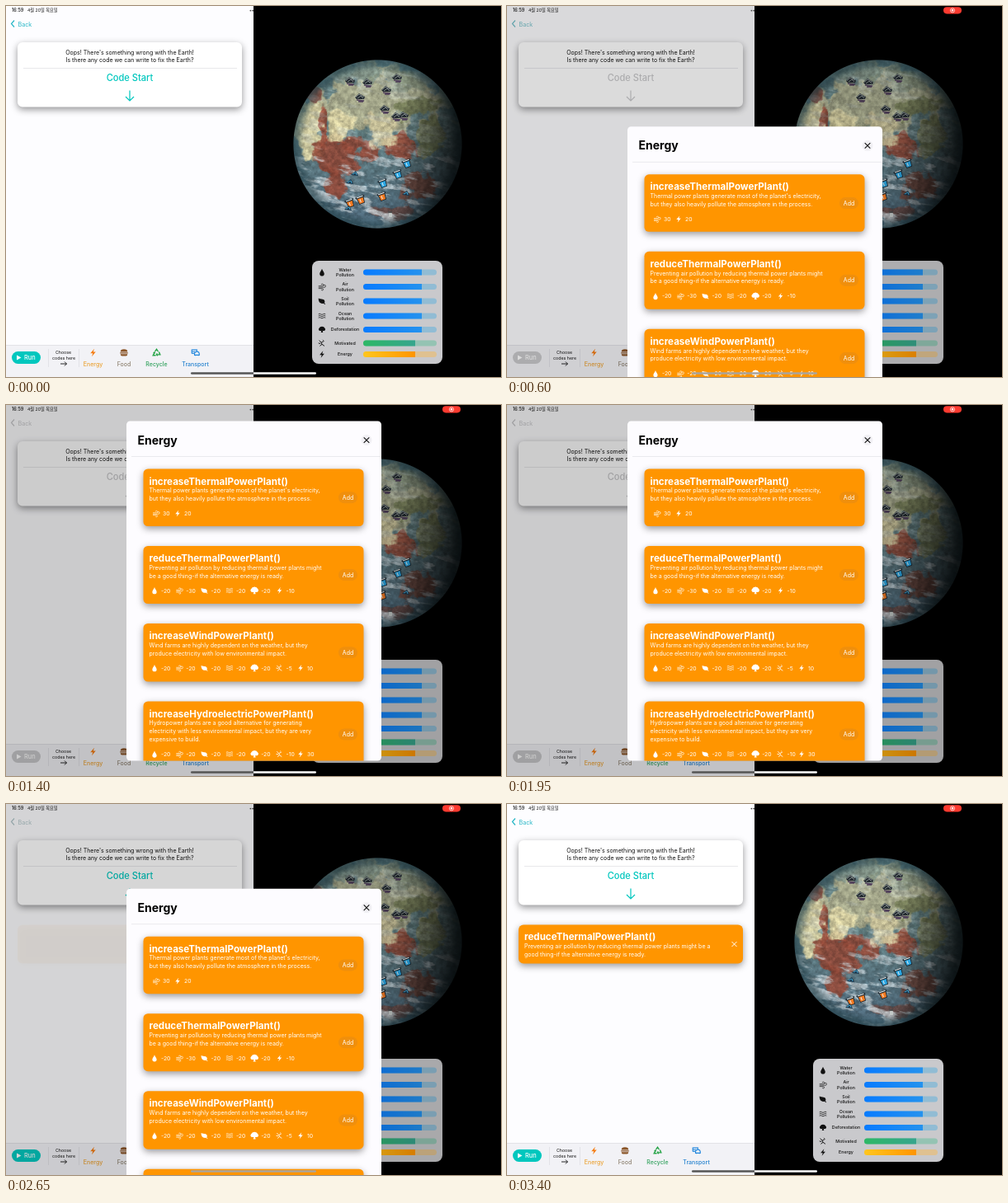
Animation, 600 px wide and 450 px high, one loop 3450 ms. Source, as an HTML page with a canvas:

```html
<!DOCTYPE html>
<html lang="en">
<head>
<meta charset="utf-8">
<title>Fix the Earth</title>
<style>
  html, body { margin: 0; width: 100%; height: 100%; overflow: hidden; background: #000; }
  canvas { display: block; width: 600px; height: 450px; }
</style>
</head>
<body>
<canvas id="stage" width="600" height="450"></canvas>
<script>
const LOOP = 3450, STEP = 50;
const SHEET = { x: 146, top: 19.5, w: 309, h: 412, openAt: 455, closeAt: 2605.5 };
const ORANGE = '#ff9500', MINT = [0, 199, 190], TEAL = [38, 182, 198], GRAY = [200, 200, 202];
const stageCtx = document.getElementById('stage').getContext('2d');
let ctx = stageCtx;

// Glyphs live in a 10-unit box around the origin.
const ICONS = {
  drop: { d: 'M0-5C1-2 3.3 0 3.3 2A3.3 3.3 0 0 1-3.3 2C-3.3 0-1-2 0-5Z' },
  wind: { d: 'M-5-1H.5A1.5 1.5 0 1 0-1-2.6M-5 .8H3.4A1.7 1.7 0 1 0 1.8-1.2M-5 2.5H.5A1.3 1.3 0 1 1-.8 4', line: .8 },
  leaf: { d: 'M-5-4C-1-2 4-4 4 1C4 4-2 4.5-4 1C-5-1-5-3-5-4ZM2 1.5L5 4L4.3 4.6L1 2.5Z' },
  waves: { d: 'M-5-2.6Q-3.3-4-1.7-2.6T1.7-2.6T5-2.6M-5 0Q-3.3-1.4-1.7 0T1.7 0T5 0M-5 2.6Q-3.3 1.2-1.7 2.6T1.7 2.6T5 2.6', line: .9 },
  tree: { d: 'M-.8 1.8H-3.2A2.2 2.2 0 0 1-4-2A4.2 3.6 0 0 1 4-2A2.2 2.2 0 0 1 3.2 1.8H.8L1.5 4.2H-1.5Z' },
  person: { d: 'M-4-4L-1-1L3-3M-1-1L0 1.5L3.5 4M0 1.5L-3 4M1-4.5L2-4M-5 0L-2 .5', line: 1.1 },
  bolt: { d: 'M1.6-5L-3.4 .8H-.3L-1.6 5L3.4-1H.3Z' },
  recycle: { d: 'M-2-1.5L0-4.5L2-1.5M3-1L4.5 2.5H1.2M-1 3.5H-4.5L-2.8 0M.8 1L0 2.5L1.4 4M-4 .5L-2.8-.5L-1.8 1', line: 1.5 },
  burger: { d: 'M-4.5-1A4.5 3.4 0 0 1 4.5-1ZM-5-.3H5V1H-5ZM-4.5 1.8H4.5Q4.5 4.3 2.5 4.3H-2.5Q-4.5 4.3-4.5 1.8Z' },
  car: { d: 'M-4.5 1V-3.5H2V-1M-4.5-1H0M-1 3V1L0-1H4L5 1V3ZM-4.5 1H-1M0 3V4M4 3V4', line: 1.2 }
};
for (const icon of Object.values(ICONS)) icon.path = new Path2D(icon.d);

const CARDS = [
  { y: 58, h: 69.5, title: 'increaseThermalPowerPlant()',
    lines: ["Thermal power plants generate most of the planet's electricity,", 'but they also heavily pollute the atmosphere in the process.'],
    stats: [['wind', '30'], ['bolt', '20']] },
  { y: 151.5, h: 70, title: 'reduceThermalPowerPlant()',
    lines: ['Preventing air pollution by reducing thermal power plants might', 'be a good thing-if the alternative energy is ready.'],
    stats: [['drop', '-20'], ['wind', '-30'], ['leaf', '-20'], ['waves', '-20'], ['tree', '-20'], ['bolt', '-10']] },
  { y: 245.5, h: 70.5, title: 'increaseWindPowerPlant()',
    lines: ['Wind farms are highly dependent on the weather, but they', 'produce electricity with low environmental impact.'],
    stats: [['drop', '-20'], ['wind', '-20'], ['leaf', '-20'], ['waves', '-20'], ['tree', '-20'], ['person', '-5'], ['bolt', '10']] },
  { y: 340, h: 80, title: 'increaseHydroelectricPowerPlant()',
    lines: ['Hydropower plants are a good alternative for generating', 'electricity with less environmental impact, but they are very', 'expensive to build.'],
    stats: [['drop', '-20'], ['wind', '-20'], ['leaf', '-20'], ['waves', '-20'], ['tree', '-20'], ['person', '-10'], ['bolt', '30']] }
];

const clamp = v => Math.max(0, Math.min(1, v));
const smooth = v => { v = clamp(v); return v * v * (3 - 2 * v); };
const lerp = (a, b, k) => a + (b - a) * k;
const blend = (a, b, k) => a.map((v, i) => lerp(v, b[i], k));
const mix = (a, b, k) => `rgb(${blend(a, b, k).map(Math.round).join()})`;
const spring = (t, w) => t <= 0 ? 0 : 1 - (1 + w * t / 1000) * Math.exp(-w * t / 1000);

function text(str, x, y, size, color, weight = 400, align = 'left') {
  ctx.font = `${weight} ${size}px Inter, "Noto Sans CJK KR", "Noto Sans CJK", sans-serif`;
  ctx.textAlign = align;
  ctx.fillStyle = color;
  ctx.fillText(str, x, y + size * .36);
}

function box(x, y, w, h, r, fill, shadow) {
  ctx.save();
  if (shadow) {
    ctx.shadowColor = `rgba(0,0,0,${shadow})`;
    ctx.shadowBlur = 9;
    ctx.shadowOffsetY = 3;
  }
  ctx.beginPath();
  ctx.roundRect(x, y, w, h, r);
  ctx.fillStyle = fill;
  ctx.fill();
  ctx.restore();
}

function path(d, color, width) {
  const p = new Path2D(d);
  if (width) {
    ctx.strokeStyle = color;
    ctx.lineWidth = width;
    ctx.stroke(p);
  } else {
    ctx.fillStyle = color;
    ctx.fill(p);
  }
}

function icon(name, x, y, size, color) {
  const { path, line } = ICONS[name];
  ctx.save();
  ctx.translate(x, y);
  ctx.scale(size / 10, size / 10);
  ctx.fillStyle = ctx.strokeStyle = color;
  ctx.lineWidth = line || 1;
  line ? ctx.stroke(path) : ctx.fill(path);
  ctx.restore();
}

function gradient(x0, x1, ...colors) {
  const g = ctx.createLinearGradient(x0, 0, x1, 0);
  colors.forEach((c, i) => g.addColorStop(i / (colors.length - 1), c));
  return g;
}

function hash(x, y) {
  const s = Math.sin(x * 127.1 + y * 311.7) * 43758.5453;
  return s - Math.floor(s);
}

function noise(x, y) {
  const ix = Math.floor(x), iy = Math.floor(y), u = smooth(x - ix), v = smooth(y - iy);
  return lerp(lerp(hash(ix, iy), hash(ix + 1, iy), u), lerp(hash(ix, iy + 1), hash(ix + 1, iy + 1), u), v);
}

function fractal(x, y) {
  let sum = 0;
  for (let i = 0, amp = .5; i < 4; i++, amp /= 2, x *= 2.03, y *= 2.03) sum += amp * noise(x, y);
  return sum / .9375;
}

// Regions of the globe: centre, radii and colour; noise frays their edges.
const LAND = [172, 172, 140], PALE = [214, 206, 160], RUST = [142, 72, 56], GREEN = [118, 126, 88];
const REGIONS = [
  [450, 112, 92, 46, LAND], [420, 82, 42, 12, [125, 144, 134]], [485, 88, 35, 15, [128, 140, 120]],
  [368, 148, 19, 34, PALE], [372, 106, 12, 9, RUST], [385, 145, 5, 22, RUST],
  [401, 186, 24, 26, RUST], [424, 166, 18, 12, RUST], [478, 170, 22, 15, RUST], [438, 178, 15, 12, RUST],
  [404, 146, 17, 18, PALE], [454, 150, 17, 22, [200, 192, 152]], [512, 157, 18, 22, GREEN],
  [492, 125, 30, 14, GREEN], [398, 214, 18, 16, RUST], [500, 218, 24, 20, [112, 72, 62]], [470, 252, 25, 9, [105, 76, 72]]
];

function globeColor(x, y) {
  const n = fractal(x / 13, y / 13), detail = fractal(x / 4 + 30, y / 4);
  let color = blend([96, 124, 126], [78, 104, 120], clamp((y - 150) / 100));
  for (const [cx, cy, rx, ry, tone] of REGIONS) {
    const d = Math.hypot((x - cx) / rx, (y - cy) / ry);
    color = blend(color, tone, smooth((1.05 - d + (n - .5) * 1.7) * 3.5) * .9);
  }
  const streak = fractal((x + y * .45) / 20, (y - x * .25) / 6 + 60);
  const southern = clamp((y - 172) / 22);
  color = blend(color, [200, 211, 216], smooth((streak - .48) * 5) * lerp(.25, .72, southern));
  color = color.map(c => c * lerp(.72, 1.28, detail));
  const edge = Math.hypot(x - 450.5, y - 167.5) / 102;
  const light = (1 - .78 * smooth((x + (y - 167) * .12 - 462) / 95)) * (1 - .3 * smooth((edge - .84) / .16));
  return blend(color, [62, 115, 132], .55 * smooth((edge - .86) / .14)).map(c => c * light);
}

function plant(x, y) {
  ctx.save();
  ctx.translate(x, y);
  path('M-6 0L-1-5L6-1L5 2L-4 2Z', '#232a30');
  path('M-5-.5L-1-4L5-1M-3 1L1-2L4 1', '#9ca5a2', .8);
  path('M-4 3L5 4M-2 5H4', '#50405a', 1.3);
  ctx.restore();
}

function can(x, y, color) {
  ctx.save();
  ctx.translate(x, y);
  ctx.rotate(-.35);
  path('M-5.5-4.5H5.5V-2.5H4.5L3.5 5H-3.5L-4.5-2.5H-5.5Z', '#17232c');
  path('M-3.6-2H3.6L2.8 4.2H-2.8Z', color);
  path('M-4-3.5H4M-.7-1V3', '#e8eeee', 1);
  ctx.restore();
}

function drawEarth() {
  const left = 347, top = 64, size = 207, pixels = ctx.createImageData(size, size);
  for (let i = 0; i < size * size; i++) {
    const x = left + i % size + .5, y = top + Math.floor(i / size) + .5;
    const cover = clamp(102.6 - Math.hypot(x - 450.5, y - 167.5));
    if (cover) pixels.data.set([...globeColor(x, y), cover * 255], i * 4);
  }
  ctx.putImageData(pixels, left, top);

  [[417, 91], [438, 93], [474, 87], [461, 102], [429, 111], [459, 125], [473, 134], [482, 133]].forEach(p => plant(...p));
  [[417, 239], [430, 235], [456, 231]].forEach(p => can(...p, '#f47b22'));
  [[486, 191], [475, 204], [457, 215]].forEach(p => can(...p, '#2ba6e2'));
  for (const [x, y] of [[423, 203], [417, 213], [485, 227], [415, 245]]) {
    path(`M${x - 5} ${y + 2}L${x + 1} ${y - 3}L${x + 4} ${y + 3}Z`, '#17344b');
    path(`M${x - 3} ${y + 1}L${x + 1} ${y - 1}L${x + 2} ${y + 2}`, '#45a4cd', 1);
  }
  box(464, 251, 4, 5, 1, '#c3c9c7');
  path('M463 250H468', '#3d4a4d', 1);
}

function drawPanel() {
  box(371, 309, 158, 125, 8, '#c9c9cc');
  const blue = ['#087bff', '#2492ee', '#91bcd4'], rows = [
    ['drop', 323, ['Water', 'Pollution'], 504, blue],
    ['wind', 340.5, ['Air', 'Pollution'], 504, blue],
    ['leaf', 358, ['Soil', 'Pollution'], 504, blue],
    ['waves', 376, ['Ocean', 'Pollution'], 504, blue],
    ['tree', 392.5, ['Deforestation'], 504, blue],
    ['person', 409, ['Motivated'], 496, ['#2db865', '#37a58d', '#94c3b3']],
    ['bolt', 422.5, ['Energy'], 496, ['#ffc61e', '#ff9500', '#dfc190']]
  ];
  for (const [name, y, label, end, [from, to, rest]] of rows) {
    icon(name, 383, y, 8.5, '#111');
    label.forEach((s, i) => text(s, 411, y + (i - (label.length - 1) / 2) * 6.6, 5.3, '#111', 500, 'center'));
    box(433, y - 3.6, 89, 7.2, 3.6, rest);
    box(433, y - 3.6, end - 433, 7.2, [3.6, 0, 0, 3.6], gradient(433, end, from, to));
  }
}

const planetLayer = document.createElement('canvas');
planetLayer.width = 600;
planetLayer.height = 450;
ctx = planetLayer.getContext('2d');
drawEarth();
drawPanel();
ctx = stageCtx;

function drawEditor(tint, backTint, added) {
  box(0, 0, 300, 450, 0, '#fdfdff');
  path('M10 17.5L6.5 21.5L10 25.5', backTint, 1.2);
  text('Back', 14.5, 22, 7.2, backTint);

  box(14, 44, 272, 78.5, 6, '#fff', .42);
  text("Oops! There's something wrong with the Earth!", 150, 56, 7, '#111', 400, 'center');
  text('Is there any code we can write to fix the Earth?', 150, 65, 7, '#111', 400, 'center');
  path('M21 75.5H280', '#dedee2', .7);
  text('Code Start', 150, 87.5, 11.1, tint, 500, 'center');
  path('M150 102.5V115M145 110L150 115L155 110', tint, 1.2);

  if (added > 0) {
    ctx.globalAlpha = added;
    box(14, 146.5, 272, 47, 6, ORANGE, .4);
    text('reduceThermalPowerPlant()', 21, 161, 11.6, '#fff', 700);
    text('Preventing air pollution by reducing thermal power plants might be a', 21, 172.5, 7, '#fff');
    text('good thing-if the alternative energy is ready.', 21, 182.5, 7, '#fff');
    path('M272.5 167L278.5 173M278.5 167L272.5 173', '#fff', 1);
    ctx.globalAlpha = 1;
  }

  box(0, 411, 300, 39, 0, '#f2f2f6');
  path('M0 411.5H300M51.5 416V438M88.5 416V438', '#dcdce1', .7);
  box(7, 419, 35, 15, 7.5, tint);
  path('M13 423.5L18.5 426.5L13 429.5Z', '#fff');
  text('Run', 22, 426.5, 7.4, '#fff', 500);
  text('Choose', 69.5, 420.5, 5.3, '#111', 400, 'center');
  text('codes here', 70, 427, 5.3, '#111', 400, 'center');
  path('M66 434H73.5M71 431.5L73.5 434L71 436.5', '#111', .9);
  const tabs = [
    ['bolt', 'Energy', 105.5, '#f57c12', '#eba234'], ['burger', 'Food', 143, '#8a5528', '#8d8170'],
    ['recycle', 'Recycle', 182.5, '#28a549', '#31a15d'], ['car', 'Transport', 229.5, '#2387dd', '#2582cf']
  ];
  for (const [name, label, x, color, labelColor] of tabs) {
    icon(name, x, 420.5, 9.5, color);
    text(label, x, 434, 7, labelColor, 500, 'center');
  }
}

function drawCard({ y, h, title, lines, stats }) {
  box(166.5, y, 267, h, 5.5, ORANGE, .4);
  text(title, 173.5, y + 15, 11.6, '#fff', 700);
  lines.forEach((line, i) => text(line, 173.5, y + 26.3 + i * 9.8, 7, '#fff'));
  const addY = y + h / 2;
  box(403, addY - 7, 23, 14, 7, '#f08f0c');
  text('Add', 414.5, addY, 7, '#fff', 400, 'center');
  const row = y + 34.5 + lines.length * 9.8;
  let x = stats.length === 2 ? 182 : 180;
  for (const [name, value] of stats) {
    icon(name, x, row, name === 'tree' ? 10 : 8, '#fff');
    text(value, x + 8, row, 6.8, '#fff');
    x += stats.length === 2 ? 26 : name === 'person' ? 25.5 : 30.3;
  }
}

function drawSheet(top) {
  ctx.save();
  ctx.beginPath();
  ctx.roundRect(SHEET.x, top, SHEET.w, SHEET.h, 4.5);
  ctx.fillStyle = '#fdfcff';
  ctx.fill();
  ctx.clip();
  ctx.translate(0, top);
  text('Energy', 159.5, 23, 14, '#000', 700);
  box(430.5, 16.5, 13, 13, 6.5, '#f1f0f4');
  path('M433.7 19.8L440.3 26.4M440.3 19.8L433.7 26.4', '#111', 1.1);
  path('M152 43H455', '#e3e2e7', .7);
  CARDS.forEach(drawCard);
  ctx.restore();
}

function drawStatus(t, top) {
  text('16:59', 7, 5.5, 5.5, '#111', 500);
  text('4월 20일 목요일', 26, 5.5, 5.2, '#111');
  box(295.5, 4.7, 1.8, 1.8, .9, '#444');
  box(298.2, 4.7, 1.8, 1.8, .9, '#444');
  if (t >= 100) {
    box(529, 1.2, 22, 8.2, 4.1, '#ff3b30');
    ctx.strokeStyle = '#fff';
    ctx.lineWidth = .7;
    ctx.beginPath();
    ctx.arc(540, 5.3, 2.6, 0, 7);
    ctx.stroke();
    box(538.8, 4.1, 2.4, 2.4, 1.2, '#fff');
  }
  const covered = top < 443 && top + SHEET.h > 447;
  if (covered) {
    box(224, 444.2, 152, 2.6, 1.3, '#aaa49c');
  } else {
    box(224, 444.2, 76, 2.6, [1.3, 0, 0, 1.3], '#555');
    box(300, 444.2, 76, 2.6, [0, 1.3, 1.3, 0], '#fff');
  }
}

function draw(t) {
  const closing = t >= SHEET.closeAt;
  const shown = closing ? 1 - spring(t - SHEET.closeAt, 18.1) : spring(t - SHEET.openAt, 17);
  const top = 450 - (450 - SHEET.top) * shown;
  const dimmedTint = closing ? 1 - clamp((t - SHEET.closeAt) / 45) : clamp((t - SHEET.openAt) / 140);
  const dimmedBack = closing ? 1 - clamp((t - SHEET.closeAt) / 300) : clamp((t - SHEET.openAt) / 300);

  ctx.fillStyle = '#000';
  ctx.fillRect(0, 0, 600, 450);
  ctx.drawImage(planetLayer, 0, 0);
  drawEditor(mix(MINT, GRAY, dimmedTint), mix(TEAL, GRAY, dimmedBack), smooth((t - 2620) / 240));
  ctx.fillStyle = `rgba(0,0,0,${.2 * shown})`;
  ctx.fillRect(0, 0, 600, 450);
  if (top < 449.5) drawSheet(top);
  drawStatus(t, top);
}

const start = performance.now();
function tick() {
  const t = (performance.now() - start) % LOOP;
  draw(Math.floor(t / STEP) * STEP);
  requestAnimationFrame(tick);
}
tick();
</script>
</body>
</html>
```
